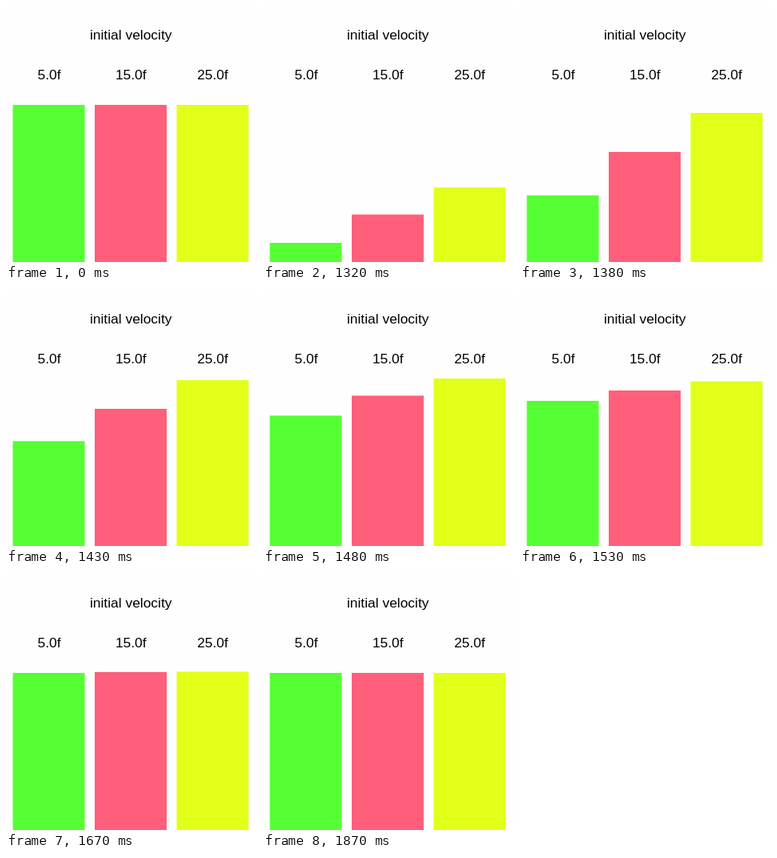
These frames come from a looping animation (314x321 px, 3.09 s). An HTML page with a canvas:

```html
<!DOCTYPE html>
<html lang="en">
<head>
<meta charset="utf-8">
<title>Spring velocity</title>
<style>
  html, body { margin: 0; width: 100%; height: 100%; overflow: hidden; background: #fefefe; }
  canvas { display: block; }
</style>
</head>
<body>
<canvas id="stage" width="314" height="321"></canvas>
<script>
const ctx = document.getElementById('stage').getContext('2d');
const WIDTH = 314, HEIGHT = 321;
const LOOP = 3090, LAUNCH = 1320, SETTLED = 1870;
const REST = 124, BAR_WIDTH = 90, BAR_GAP = 12.5;
const FONT = '17.4px "Liberation Sans", Arial, sans-serif';

// One damped spring drives all bars; rates are per second.
const DECAY = 13.5, SWING = 7;

// offset: share of the height still missing at launch; push: sine part of the swing.
const bars = [
  { label: '5.0f', color: '#55ff33', offset: 0.881, push: 1.23 },
  { label: '15.0f', color: '#ff5f7a', offset: 0.708, push: 0.09 },
  { label: '25.0f', color: '#e2ff1a', offset: 0.538, push: -0.9 }
];

function barTop({ offset, push }, time) {
  if (time < LAUNCH || time >= SETTLED) return REST;
  const t = (time - LAUNCH) / 1000;
  const missing = Math.exp(-DECAY * t)
    * (offset * Math.cos(SWING * t) + push * Math.sin(SWING * t));
  const top = REST + (HEIGHT - REST) * missing;
  return Math.round(top * 2) / 2;
}

function drawText(text, x, y) {
  ctx.fillStyle = '#000';
  ctx.fillText(text, x, y);
}

function draw(time) {
  ctx.fillStyle = '#fefefe';
  ctx.fillRect(0, 0, WIDTH, HEIGHT);
  ctx.font = FONT;
  ctx.textAlign = 'center';
  drawText('initial velocity', 156.2, 42);
  bars.forEach((bar, i) => {
    const x = 8.5 + i * (BAR_WIDTH + BAR_GAP);
    const top = barTop(bar, time);
    drawText(bar.label, 54 + i * 102.25, 92);
    ctx.fillStyle = bar.color;
    ctx.fillRect(x, top, BAR_WIDTH, HEIGHT - top);
  });
}

const began = performance.now();
function frame() {
  draw((performance.now() - began) % LOOP);
  requestAnimationFrame(frame);
}
frame();
</script>
</body>
</html>
```
